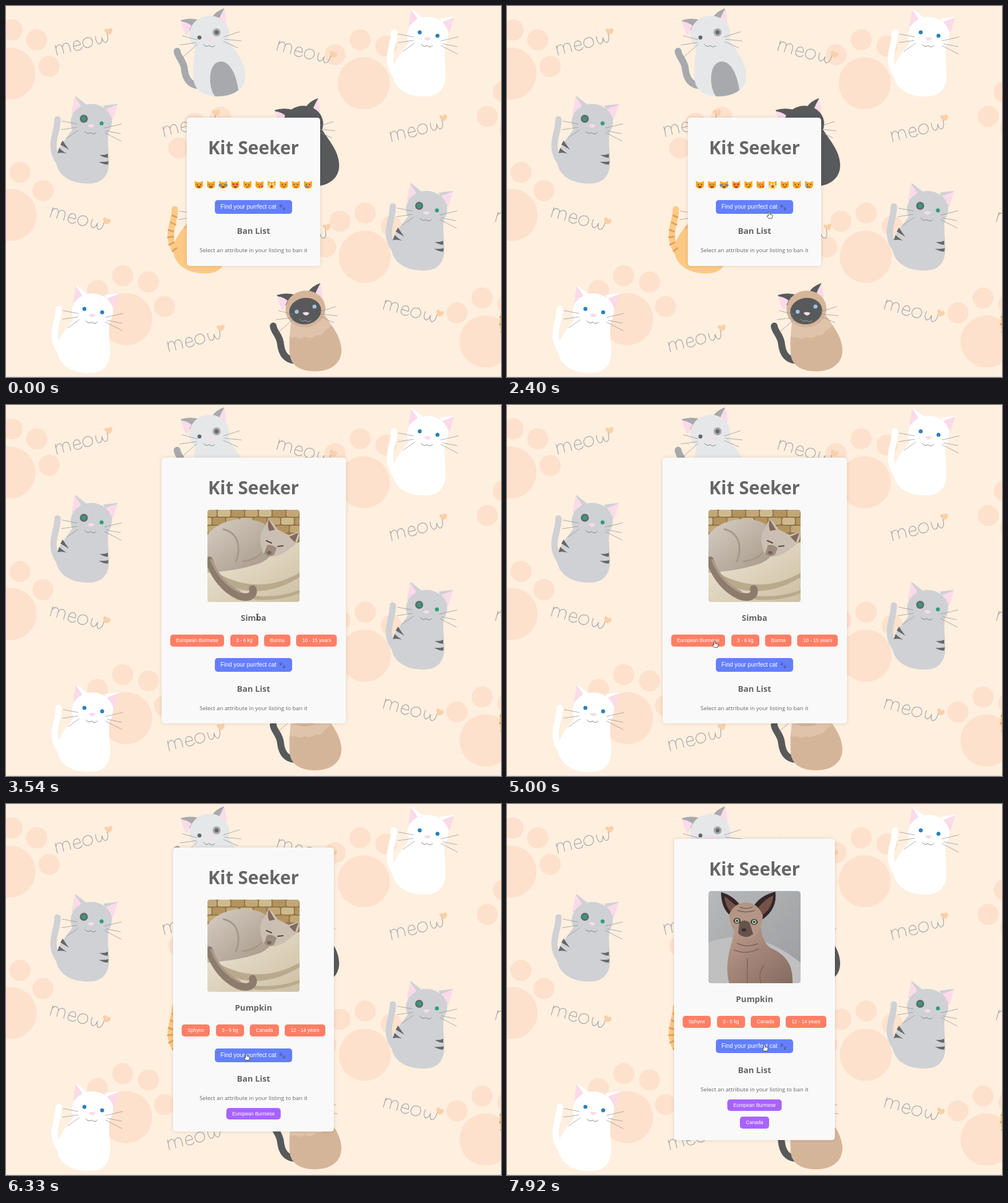
Animation of 865x648 px, one loop 8 s. Source, as an HTML page:

```html
<!DOCTYPE html>
<html lang="en">
<head>
<meta charset="utf-8">
<title>Kit Seeker</title>
<style>
html, body { margin: 0; width: 100%; height: 100%; overflow: hidden; background: #feefdf; }
svg { display: block; }
#scene, #cursor { position: absolute; left: 0; top: 0; }
#card { position: absolute; background: #f9f9f9; border-radius: 5px; box-shadow: 0 0 7px rgba(0,0,0,.12);
  color: #666; font: 9.84px "Open Sans", "Noto Sans", sans-serif; }
.row { position: absolute; left: 0; right: 0; height: 20px; line-height: 20px; margin-top: -10px;
  display: flex; justify-content: center; white-space: nowrap; }
.h1 { font-size: 31.5px; font-weight: 700; }
.h2 { font-size: 14.5px; font-weight: 700; }
.chips { gap: 10.3px; font: 8.6px/20.5px "Liberation Sans", Arial, sans-serif; color: #fff; }
.chips span { height: 20.5px; padding: 0 10.3px; border-radius: 5px; background: #ff7f66; }
.ban span { background: #a863ff; }
.btn { left: 50%; right: auto; width: 135px; height: 24px; margin: -12px 0 0 -67.5px; border-radius: 5px;
  background: #637fff; color: #fff; font: 10.35px/24px "Liberation Sans", Arial, sans-serif; }
.btn svg { margin: 7px 0 0 5px; }
.photo { position: absolute; left: 50%; top: 90.5px; width: 161px; height: 161px; margin-left: -80.5px;
  border-radius: 5px; overflow: hidden; }
</style>
</head>
<body>
<svg id="scene" width="865" height="648"></svg>
<div id="card"></div>
<svg id="cursor" width="865" height="648"></svg>
<script>
const $ = id => document.getElementById(id);
const path = (d, fill) => `<path d="${d}" fill="${fill}"/>`;
const line = (d, color, w) => `<path d="${d}" fill="none" stroke="${color}" stroke-width="${w}" stroke-linecap="round" stroke-linejoin="round"/>`;
const dot = (x, y, r, fill, ry = r) => `<ellipse cx="${x}" cy="${y}" rx="${r}" ry="${ry}" fill="${fill}"/>`;
const group = (transform, s) => `<g transform="${transform}">${s}</g>`;
const PINK = '#fbdaea', DARK = '#666769', GREY = '#a7a9ac';

// ---- background pattern ----
const paw = (x, y, turn = 0, flip = 1) => group(`translate(${x} ${y}) rotate(${turn}) scale(${flip} 1)`,
  dot(0, 0, 45.5, '#fde1cc') +
  [[-50, -50], [-6, -76], [39, -65], [67, -22]].map(([a, b]) => dot(a, b, 18.5, '#fde1cc')).join(''));

const meow = (x, y, turn) => group(`translate(${x} ${y}) rotate(${turn}) scale(.96)`,
  line('M0 0V18M0 7C2-2 12-2 12 7V17M12 7C14-2 24-2 25 7V17M32 9H45C46-2 33-3 32 9C31 20 43 20 47 14' +
    'M60-1C46-1 47 18 59 17C71 16 70-1 60-1M75 1C72 17 84 21 86 5C86 21 98 18 97 0', GREY, 1.35) +
  path('M101 3C92-3 92-9 97-9Q100-9 101-6Q103-10 106-8C110-5 107 0 101 3Z', '#f9d0a8'));

const face = (x, y, mouth) =>
  path(`M${x - 6} ${y - 2}Q${x} ${y - 5} ${x + 6} ${y - 2}Q${x + 1} ${y + 7} ${x - 6} ${y - 2}Z`, PINK) +
  line(`M${x - 11} ${y + 9}Q${x - 6} ${y + 15} ${x - 1} ${y + 11}Q${x + 5} ${y + 16} ${x + 9} ${y + 11}`, mouth, .9);

const plainCat = (x, y, coat, extra) => group(`translate(${x} ${y})`,
  line('M92 529C92 548 84 560 85 577C86 592 92 600 98 608', coat, 11) +
  path('M119 545C108 563 85 582 90 607C96 633 124 642 147 641C171 641 183 626 182 600C181 578 178 560 183 545Z', coat) +
  path('M123 488L142 503L124 522L117 518ZM197 502L172 505L186 532Z', coat) +
  path('M122 489L117 519Q127 514 133 505ZM197 503L176 511Q183 520 189 530Z', PINK) +
  dot(151, 534, 36, coat, 32) + extra + face(150.5, 541, '#777') +
  line('M126 537L100 532M126 543L99 547M128 548L108 562M174 544L204 537M177 549L202 554M174 552L203 567', '#8a8a8a', .7));

const blueEyes = dot(137, 529, 3.5, '#2b80bd') + dot(168, 535, 3.5, '#2b80bd');
const tabby = dot(138, 528, 7, DARK) + dot(138, 528, 4, '#2f9f78') + dot(169, 536, 3.5, '#2f9f78') +
  path('M101 566L97 573Q104 577 112 582Q106 574 101 566ZM95 579L92 588Q100 586 108 589Q100 584 95 579Z' +
    'M165 591Q174 592 180 589V596Q173 596 165 591ZM164 603Q174 604 181 602L180 608Q172 608 164 603Z', DARK);
const ginger = line('M88 540l7 3M85 552l8 4M81 565l8 3M80 578l9-1M82 591l8-4M88 602l7-5', '#dfa25f', 3);

const spottedCat = (x, y, c) => group(`translate(${x} ${y})`,
  line('M299 79C300 90 311 95 312 112C314 128 322 138 336 139', c.tail, 12) +
  path('M334 62C326 90 327 115 328 130C331 150 350 159 376 158C402 157 420 142 418 118C416 95 402 80 389 60Z', c.coat) +
  c.chest +
  path('M305 25Q320 20 336 24L322 44ZM381 4Q365 10 360 20L384 38Z', c.ear) +
  path('M306 27Q316 28 324 34L316 52Q310 44 306 27ZM381 5Q376 14 373 21L384 40Q387 24 381 5Z', PINK) +
  group('rotate(-8 357 47)', dot(355, 49, 35, c.coat, 32)) + c.face + face(356, 58, c.mouth) +
  line('M334 59L308 52M333 64L304 68M334 67L308 90M380 54L408 45M382 58L411 61M380 62L405 73', '#8a8a8a', .7));

const smoke = { coat: '#e6e7e9', tail: GREY, ear: GREY, mouth: '#777',
  chest: path('M366 158C354 148 350 97 376 97C394 98 403 125 406 147Q392 158 366 158Z', GREY),
  face: dot(338, 55, 3.5, DARK) + dot(368, 46, 7, GREY) + dot(368, 46, 3.5, DARK) };
const black = { coat: '#58595b', tail: '#58595b', ear: '#58595b', mouth: '#999', chest: '', face: '' };
const siamese = { coat: '#d5b59a', tail: '#58595b', ear: '#58595b', mouth: '#aaa',
  chest: path('M330 68L328 95Q331 102 338 98Q346 104 354 98Q364 103 374 95Q384 97 388 88L401 78L386 60Z', '#dfc4ab'),
  face: group('rotate(-8 354 54)', dot(355, 53, 28, '#58595b', 23)) + dot(340, 54, 3.5, '#9cc5e8') + dot(371, 45, 3.5, '#9cc5e8') };

$('scene').innerHTML =
  paw(6, 118, 8) + paw(625, 135) + paw(8, 365, 8, -1) + paw(627, 438, -4, -1) + paw(210, 547) +
  paw(838, 586) + paw(908, 215, 0, -1) + paw(369, 270, 0, -1) +
  [[86, 69], [671, 220], [274, 211], [282, 587], [467, 411]].map(([x, y]) => meow(x, y, -13)).join('') +
  [[478, 61], [82, 352], [664, 513], [860, 360]].map(([x, y]) => meow(x, y, 16)).join('') +
  spottedCat(0, 0, smoke) + spottedCat(164, 157, black) + spottedCat(168, 480, siamese) +
  plainCat(0, 0, '#fff', blueEyes) + plainCat(586, -483, '#fff', blueEyes) +
  plainCat(-2, -331, '#cfd1d4', tabby) + plainCat(584, -179, '#cfd1d4', tabby) +
  plainCat(203, -174, '#fcc985', ginger) + plainCat(783, -22, '#fcc985', ginger) +
  '<rect y="647" width="865" height="1" fill="#e3e1df"/>';

// ---- card contents ----
const eyes = dot(-2.8, 0, 1, '#5d3a1a') + dot(2.8, 0, 1, '#5d3a1a');
const smile = line('M-2.5 3Q0 5.5 2.5 3', '#5d3a1a', 1);
const grin = path('M-3.2 2.5H3.2Q2.5 5.8 0 5.8T-3.2 2.5Z', '#8a4a20');
const squint = line('M-4 .3Q-2.8-1.5-1.6.3M1.6.3Q2.8-1.5 4 .3', '#5d3a1a', .9);
const hearts = dot(-3, -.5, 2, '#e8344e') + dot(3, -.5, 2, '#e8344e');
const frown = line('M-2 4.5Q0 2.5 2 4.5', '#5d3a1a', 1);
const moods = [eyes + grin, squint + grin,
  squint + grin + dot(-5.5, 1, 2.4, '#3f8df0', 2) + dot(5.5, 1, 2.4, '#3f8df0', 2),
  hearts + grin, eyes + line('M-1.5 4Q1 4.5 3 2.5', '#5d3a1a', 1),
  squint + dot(0, 3.5, 1.2, '#b04030') + dot(4.6, 3.5, 1.8, '#e8344e'),
  dot(-2.7, -1, 1.5, '#fff') + dot(2.7, -1, 1.5, '#fff') + dot(0, 3.5, 1.4, '#6b3d1c') + dot(-5, 4, 2, '#ffe0a0', 3) + dot(5, 4, 2, '#ffe0a0', 3),
  eyes + smile, eyes + frown, eyes + frown + dot(-3.4, 3.5, 1.5, '#3f8df0', 2.2)];
const emojis = `<svg style="position:absolute;left:0;top:108px" width="233" height="18">${moods.map((m, i) =>
  group(`translate(${21 + i * 21.2} 9)`,
    path('M-6.7-6.8L-2.8-4.3H2.8L6.7-6.8L7 2Q6 6.8 0 6.8T-7 2Z', '#fba41f') + m)).join('')}</svg>`;

const gradient = (id, a, b) => `<linearGradient id="${id}" x2="1" y2="1"><stop stop-color="${a}"/><stop offset="1" stop-color="${b}"/></linearGradient>`;
const photo = s => `<svg class="photo" viewBox="0 0 161 161">${s}</svg>`;
const bricks = Array.from({ length: 24 }, (_, i) => {
  const r = Math.floor(i / 8);
  return `<rect x="${i % 8 * 24 - r * 9 - 6}" y="${r * 14}" width="22" height="12" rx="3" fill="${['#c2a877', '#b3945f', '#cdbb8f'][(i * 5 + r) % 3]}"/>`;
}).join('');
const burmese = photo(`<defs>${gradient('fur', '#d6cdc2', '#a39585')}${gradient('pad', '#efe7d6', '#cdbfa3')}</defs>` +
  path('M0 0H161V161H0Z', '#94774a') + bricks +
  path('M0 100L75 92L161 56V161H0Z', 'url(#pad)') +
  path('M20 112Q90 150 161 110V118Q95 158 35 132ZM80 150Q125 154 161 140V146Q125 160 82 157Z', '#b9aa8d') +
  path('M0 44C18 18 66 8 98 24C126 45 125 80 90 94C60 104 30 108 0 110Z', 'url(#fur)') +
  line('M28 34C52 40 60 62 50 90M62 90Q82 88 94 76', '#a59889', 3) +
  path('M94 40L107 16Q118 25 122 34L142 44L160 38Q163 57 146 66Q118 90 99 78Q89 58 94 40Z', '#cabfb2') +
  path('M107 17Q104 30 108 37L118 35ZM159 40L143 47L153 57Z', '#83695d') +
  path('M104 62Q113 60 121 67L116 79Q106 84 99 77Z', '#9d8b7d') +
  line('M103 54l9 4M123 64l9-1', '#51473c', 2) + dot(108, 75, 4, '#75665d', 3) +
  line('M3 88C12 118 32 140 54 150C74 157 83 148 79 138', '#8d7c6c', 13) +
  line('M7 88C18 115 35 133 56 143', '#aa9a89', 4));
const sphynx = photo(`<defs>${gradient('wall', '#b8b9bb', '#9b9c9f')}${gradient('skin', '#bd9b8c', '#846b60')}</defs>` +
  path('M0 0H161V161H0Z', 'url(#wall)') + path('M0 90Q80 60 161 125V161H0Z', '#c0c0c1') +
  path('M45 72C40 95 27 125 36 161H147C148 130 137 112 108 99Q94 88 92 65Z', 'url(#skin)') +
  path('M37 42Q22 28 22 2Q44 8 56 26ZM80 25Q91 8 117 1Q121 31 94 50Z', '#33272a') +
  path('M39 37Q29 25 28 9L49 26ZM87 29Q99 14 113 8Q112 30 94 42Z', '#755248') +
  path('M36 41Q45 21 65 20Q86 20 95 43Q94 67 79 80Q65 87 52 78Q38 65 36 41Z', '#b39686') +
  path('M54 55Q63 48 72 55L78 75Q65 86 52 74Z', '#66534d') +
  dot(50, 52, 6, '#2f2b29', 5) + dot(80, 54, 6, '#2f2b29', 5) + dot(50, 52, 4, '#a9b09c') + dot(80, 54, 4, '#a9b09c') +
  dot(50, 52, 1.6, '#222') + dot(80, 54, 1.6, '#222') + dot(62, 68, 4, '#3b302e', 3) +
  line('M55 28Q66 33 77 28M51 34Q65 39 81 34M50 91Q66 100 86 92M45 103Q65 112 88 101M68 118V161M97 130Q86 145 92 161', '#7c6257', 1.5));

const toes = (x, y, list) => dot(x, y, 1.9, '#566092') + list.map(([a, b]) => dot(x + a, y + b, .8, '#566092')).join('');
const pawIcon = `<svg width="13" height="12">${toes(3, 4, [[-1.7, -2.8], [.5, -3.1], [2.6, -2]])}${toes(8.5, 9, [[-1.5, -3], [.8, -3.2], [2.5, -1.8]])}</svg>`;
const row = (y, cls, s) => `<div class="row ${cls}" style="top:${y}px">${s}</div>`;
const chips = (y, cls, list) => row(y, 'chips ' + cls, list.map(s => `<span>${s}</span>`).join(''));
const listing = (pic, name, tags) => pic + row(279.5, 'h2', name) + chips(319, '', tags);
const card = (x, y, w, h, shift, body, bans = []) => ({ x, y, w, h,
  html: row(52, 'h1', 'Kit Seeker') + body + row(156.3 + shift, 'btn', 'Find your purrfect cat' + pawIcon) +
    row(198 + shift, 'h2', 'Ban List') + row(230.5 + shift, '', 'Select an attribute in your listing to ban it') +
    bans.map((b, i) => chips(464.5 + i * 30.8, 'ban', [b])).join('') });

const simba = ['Simba', ['European Burmese', '3 - 6 kg', 'Burma', '10 - 15 years']];
const pumpkin = ['Pumpkin', ['Sphynx', '3 - 5 kg', 'Canada', '12 - 14 years']];
const ban1 = [simba[1][0]], ban2 = [...ban1, 'Canada'];
const views = [
  [0, card(316, 195, 233, 258.5, 0, emojis)],
  [2740, card(271.5, 92, 322, 464, 206, listing('', ...simba))],
  [2810, card(271.5, 92, 322, 464, 206, listing(burmese, ...simba))],
  [5140, card(271.5, 76.3, 322, 495.5, 206, listing(burmese, ...simba), ban1)],
  [6330, card(292, 76.3, 281, 495.5, 206, listing(burmese, ...pumpkin), ban1)],
  [6400, card(292, 76.3, 281, 495.5, 206, listing(sphynx, ...pumpkin), ban1)],
  [7460, card(292, 61, 281, 526, 206, listing(sphynx, ...pumpkin), ban2)]];

// ---- pointer ----
const outline = d => `<path d="${d}" fill="#fff" stroke="#222" stroke-width=".8" stroke-linejoin="round"/>`;
const pointers = {
  none: '',
  arrow: outline('M0 0V10L2.3 8L4 11.5L5.7 10.7L4.2 7.4H7.2Z'),
  hand: outline('M-1.2 7V1Q0-1 1.2 1V4.5L5 5.3Q6.2 5.7 6 8L5 11.5H-.8L-4 7.6Q-3.4 5.9-1.2 7.3Z'),
  beam: line('M-2-5Q0-5 0-4Q0-5 2-5M0-4V4M-2 5Q0 5 0 4Q0 5 2 5', '#222', 1) };
const track = [ // time, x, y, shape
  [0, 753, 582, 'none'], [70, 753, 582, 'arrow'], [200, 635, 480, 'arrow'], [330, 520, 402, 'beam'],
  [460, 428, 360, 'hand'], [580, 374, 338, 'hand'], [670, 383.5, 343, 'hand'], [860, 387, 344, 'hand'],
  [930, 387, 345, 'hand'], [1270, 391, 356, 'hand'], [1470, 391, 356, 'hand'], [2070, 456, 357, 'hand'],
  [2270, 456, 357, 'hand'], [2400, 458, 359.5, 'hand'], [2740, 458, 360, 'arrow'], [3280, 458, 360, 'arrow'],
  [3500, 443, 368, 'beam'], [3600, 434, 373, 'arrow'], [3860, 380, 404, 'hand'], [4070, 363, 411.5, 'hand'],
  [5140, 363, 412, 'arrow'], [5400, 390, 427, 'hand'], [5670, 417, 433, 'hand'], [5870, 417, 433, 'hand'],
  [6000, 420, 436, 'hand'], [6930, 420, 436, 'hand'], [7000, 432, 423, 'arrow'], [7100, 448, 405, 'hand'],
  [7190, 456, 402, 'hand'], [7460, 456, 402, 'arrow'], [7660, 456, 402, 'arrow'], [7780, 453, 412, 'hand'],
  [7920, 450, 420, 'hand'], [8000, 450, 420, 'hand']];

let shown;
function draw(now) {
  const t = now % 8000;
  const view = views.findLast(v => v[0] <= t)[1];
  if (view !== shown) {
    shown = view;
    $('card').style.cssText = `left:${view.x}px;top:${view.y}px;width:${view.w}px;height:${view.h}px`;
    $('card').innerHTML = view.html;
  }
  const i = track.findLastIndex(k => k[0] <= t);
  const [t0, x0, y0, shape] = track[i], [t1, x1, y1] = track[i + 1];
  const p = (t - t0) / (t1 - t0);
  $('cursor').innerHTML = group(`translate(${x0 + (x1 - x0) * p} ${y0 + (y1 - y0) * p})`, pointers[shape]);
  requestAnimationFrame(draw);
}
draw(performance.now());
</script>
</body>
</html>
```
